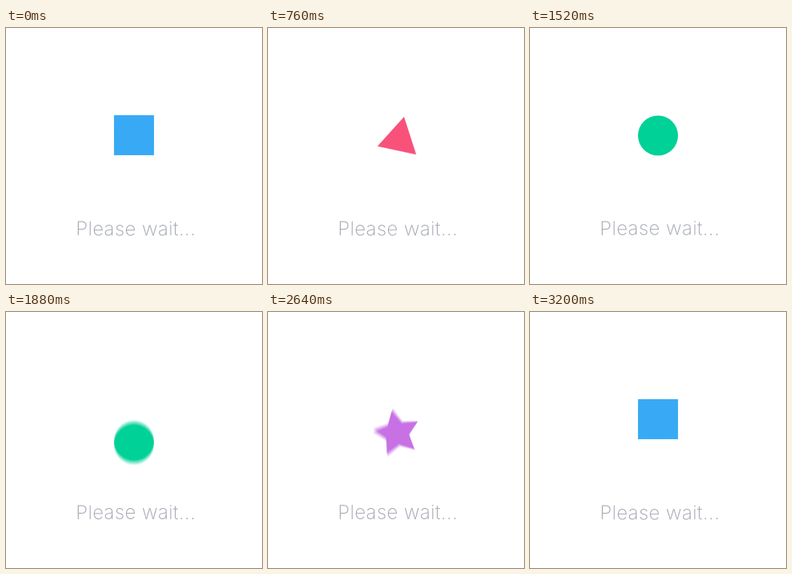
Animation, 320 px wide and 320 px high, one loop 3240 ms. Source, as an HTML page with a canvas:

```html
<!DOCTYPE html>
<html lang="en">
<head>
<meta charset="utf-8">
<title>Please wait</title>
<style>
  html, body { margin: 0; width: 100%; height: 100%; overflow: hidden; background: #fff; }
  canvas { position: absolute; left: 0; top: 0; }
</style>
</head>
<body>
<canvas id="shape" width="320" height="320"></canvas>
<canvas id="label" width="320" height="320"></canvas>
<script>
const LOOP = 3240, STEP = 40, BOUNCE = 800, HALF = BOUNCE / 2;
const SAMPLES = 15, SHUTTER = 22;
const LABEL = 'Please wait...', MID = 162, BASELINE = 259, SPACING = 0.45;

const shapeCtx = document.getElementById('shape').getContext('2d');
const labelCtx = document.getElementById('label').getContext('2d');

// Closed polygon whose corner radii alternate through the given list.
function polygon(c, x, y, n, radii) {
  for (let i = 0; i < n; i++) {
    const a = i * 2 * Math.PI / n, r = radii[i % radii.length];
    c.lineTo(x + r * Math.sin(a), y - r * Math.cos(a));
  }
  c.closePath();
}

// angle: turn at the top of the bounce; spin: degrees turned from there to the impact
const shapes = [
  { color: '#38aaf5', angle: 0, spin: 90, path: c => c.rect(-25, -25, 50, 50) },
  { color: '#f8517a', angle: 8.5, spin: -90, path: c => polygon(c, 5, 4, 3, [28.6]) },
  { color: '#00d196', angle: 0, spin: 0, path: c => c.arc(0, 0, 25, 0, 2 * Math.PI) },
  { color: '#c771e4', angle: 32.5, spin: -90, path: c => polygon(c, 1.2, 0, 10, [30, 15.3]) }
];

// Averages several moments into one motion-blurred layer, then tints it.
function blurred(c, color, t, draw) {
  c.clearRect(0, 0, 320, 320);
  c.globalCompositeOperation = 'lighter';
  c.globalAlpha = 1 / SAMPLES;
  c.fillStyle = '#fff';
  for (let i = 0; i < SAMPLES; i++) {
    c.save();
    draw(c, t + SHUTTER * ((i + 0.5) / SAMPLES - 0.5));
    c.restore();
  }
  c.globalCompositeOperation = 'source-in';
  c.globalAlpha = 1;
  c.fillStyle = color;
  c.fillRect(0, 0, 320, 320);
}

function drawShape(c, shape, time) {
  const u = Math.abs(time) / HALF;
  const fall = (time < 0 ? 81 : 91) * u ** 3.2;
  const turn = shape.angle + Math.sign(time) * shape.spin * u ** 1.4;
  c.translate(160, 134 + fall);
  c.rotate(turn * Math.PI / 180);
  c.beginPath();
  shape.path(c);
  c.fill();
}

// How far the middle of the label is pushed down: a quick hit, then a damped spring.
function sag(t) {
  const s = (t + HALF) % BOUNCE;
  if (s > BOUNCE - 20) return 13 * (s - BOUNCE + 20) / 20;
  return 13 * Math.exp(-s / 120) * Math.cos(2 * Math.PI * (s - 8) / 190);
}

function drawLabel(c, t) {
  const depth = sag(t);
  c.font = '200 24px Inter, Lato, sans-serif';
  c.textAlign = 'center';
  const widths = [...LABEL].map(ch => c.measureText(ch).width + SPACING);
  let x = MID - widths.reduce((a, b) => a + b) / 2;
  [...LABEL].forEach((ch, i) => {
    const cx = x + widths[i] / 2, u = (cx - MID) / 75;
    c.save();
    c.translate(cx, BASELINE + depth * (1 - u * u));
    c.rotate(-0.7 * Math.atan(2 * depth * u / 75));
    c.fillText(ch, 0, 0);
    c.restore();
    x += widths[i];
  });
}

function frame() {
  const t = Math.floor((performance.now() + 2) % LOOP / STEP) * STEP;
  const n = Math.ceil((t - HALF) / BOUNCE);
  const shape = shapes[n % shapes.length];
  blurred(shapeCtx, shape.color, t - n * BOUNCE, (c, time) => drawShape(c, shape, time));
  blurred(labelCtx, '#a4a8b2', t, drawLabel);
  requestAnimationFrame(frame);
}
frame();
</script>
</body>
</html>
```
